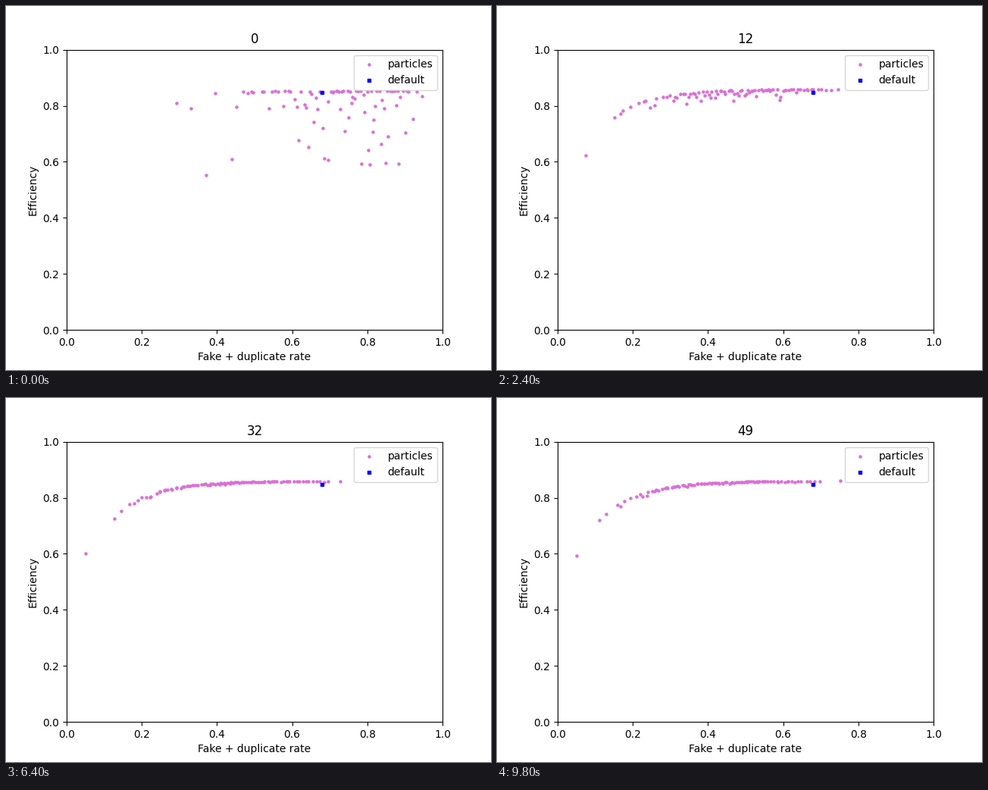
A matplotlib script for the animation above (10 s loop, 640 by 480 pixels).

```python
import numpy as np
import matplotlib.pyplot as plt
from matplotlib.animation import FuncAnimation

STEPS = 50
STEP_MS = 200
SWARM = 90
FAIL_EVERY, FAIL_AT = 15, 3


def swarm(step):
    """Scattered swarm that settles onto a saturating efficiency curve."""
    rng = np.random.default_rng(100 + step)
    early = np.exp(-step / 6)

    # Evenly ranked draws keep the band filled without clumps
    rank = (np.arange(SWARM) + rng.random(SWARM)) / SWARM
    sample = rng.beta(3.2 + 1.8 * early, 2.7 - early, 4000)
    x = (.78 + .17 * early) * np.quantile(sample, rank)

    # Losses below the curve shrink as the swarm converges
    gap = .423 * np.exp(-10 * x)
    jitter = (.0008 + .1 * gap) * rng.exponential(size=SWARM)
    stray = .3 * early * rng.random(SWARM) ** 6
    y = .86 - gap - .006 * early - jitter - stray

    # Now and then one particle fails completely
    if step % FAIL_EVERY == FAIL_AT:
        x[-1], y[-1] = 1, 0
    return np.column_stack([x, y])


fig, ax = plt.subplots(figsize=(6.4, 4.8), dpi=100)
# Just under 0.9, so centred labels round to the left pixel
fig.subplots_adjust(right=.899999)
dots = ax.scatter([], [], s=5, color="orchid", label="particles")
ax.scatter([.68], [.847], s=5, color="blue", marker="s", label="default")
ax.set(xlim=(0, 1), ylim=(0, 1), xlabel="Fake + duplicate rate", ylabel="Efficiency")
ax.legend(loc="upper right")
title = ax.set_title("0")


def draw(step):
    dots.set_offsets(swarm(step))
    title.set_text(str(step))
    return dots, title


anim = FuncAnimation(fig, draw, frames=STEPS, init_func=lambda: draw(0),
                     interval=STEP_MS, repeat=True, repeat_delay=0)
plt.show()
```
